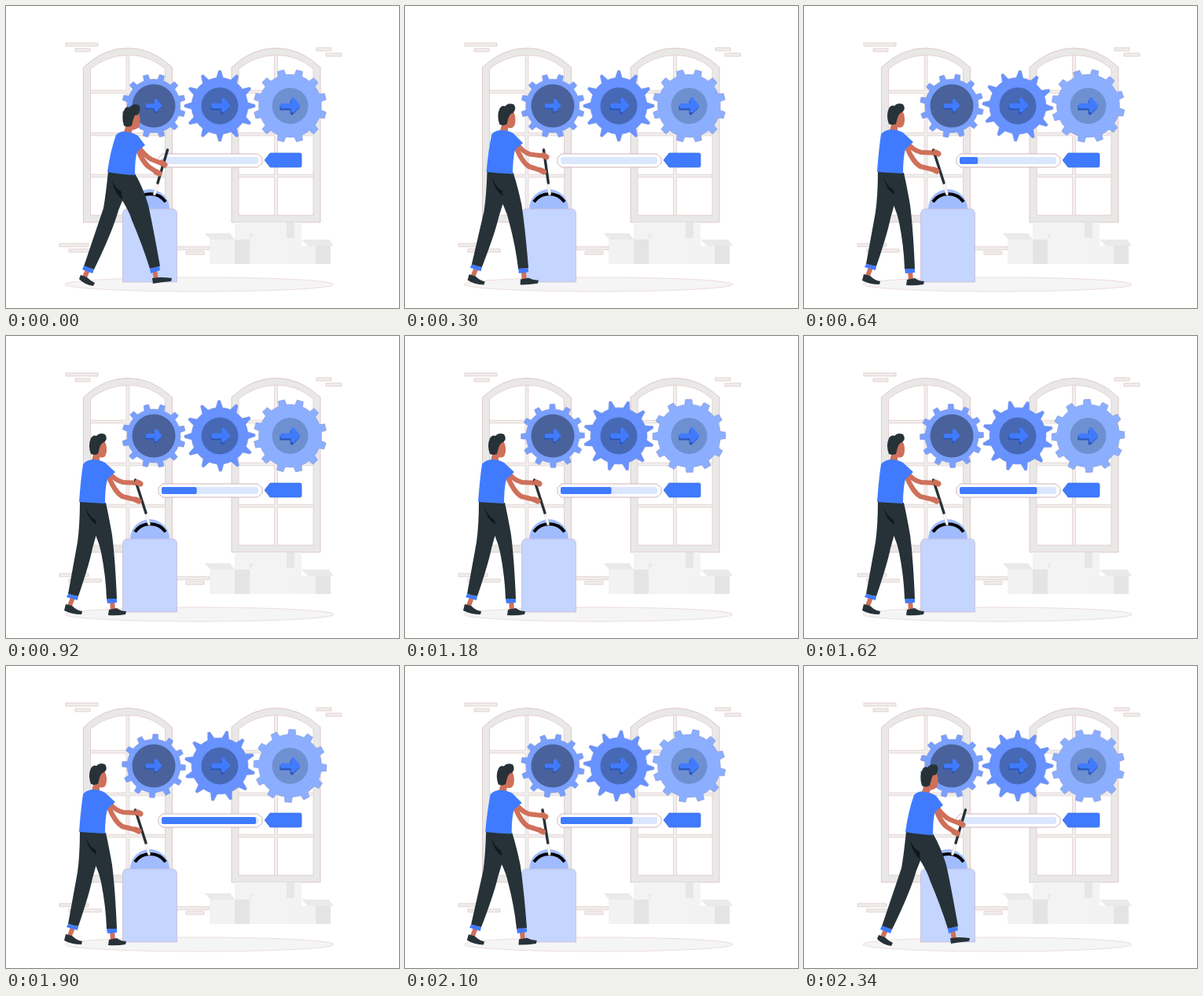
Write an HTML page that moves like this. It is 500 px wide and 384 px high and loops after 2500 ms.

```html
<!DOCTYPE html>
<html lang="en">
<head>
<meta charset="utf-8">
<title>Lever and gears</title>
<style>
  html, body { margin: 0; width: 100%; height: 100%; overflow: hidden; background: #fff; }
  svg { display: block; width: 100vw; height: 100vh; }
</style>
</head>
<body>
<svg viewBox="0 0 500 384">
  <defs>
    <g id="window">
      <path d="M98.5 275V78Q124 53.500 155 53.500T211.500 78V275Z" fill="#e9e8e8" stroke="#dabfba" stroke-width=".8"/>
      <path d="M107.500 266V80Q128 63 155 62.500T202.500 80V266Z" fill="#fff" stroke="#dec8c4" stroke-width=".8"/>
      <path d="M155 63V266M108 109H202M108 163H202M108 216H202" stroke="#e2cdc9" stroke-width="4.600"/>
      <path d="M155 63V266M108 109H202M108 163H202M108 216H202" stroke="#f0efef" stroke-width="3"/>
    </g>
    <g id="arrow">
      <path d="M-11-1H1V-6L4-8L12 2L3 11L1 9V5H-11Z" fill="#2a56b8"/>
      <path d="M-9-3H2V-9L5-10L13 0L5 8L2 7V3H-9Q-12 0-9-3Z" fill="#407bff"/>
    </g>
  </defs>

  <ellipse cx="246" cy="354" rx="171" ry="9" fill="#f5f5f5" stroke="#e6d0cc" stroke-width=".7"/>
  <path d="M76 47h41v4h-41zM88 54h19v4h-19zM395 53h19v4h-19zM407 60h20v4h-20zM68 302h37v4h-37zM80 309h41v4h-41zM205 306h54v4h-54zM229 312h23v4h-23z"
        fill="#f0eeee" stroke="#dcc2bd" stroke-width=".7"/>
  <use href="#window"/>
  <use href="#window" x="188.5"/>

  <path d="M291 275H376V328H291Z" fill="#f3f3f3"/>
  <path d="M357 275H367V295H357Z" fill="#e6e6e6"/>
  <path d="M259 297H310V328H259ZM362 305H413V328H362Z" fill="#f2f2f2"/>
  <path d="M291 297H310V328H291ZM394 305H413V328H394Z" fill="#e4e4e4"/>
  <path d="M253 289H285L291 297H260ZM310 297L315 290L310 289ZM376 297H411L417 305H384Z" fill="#ebe9e9"/>

  <g id="gears"></g>

  <path d="M199 188H320L326 193V200L320 205H199L194 200V193Z" fill="#fff" stroke="#cdb4bd"/>
  <rect x="198" y="192" width="123" height="9" rx="3" fill="#dbe6ff"/>
  <rect id="fill" x="198" y="192" height="9" rx="2" fill="#407bff"/>
  <path d="M329 196L336 187H374Q376 187 376 189V203Q376 205 374 205H336Z" fill="#407bff" stroke="#3568d8" stroke-width=".7"/>

  <path d="M158 258A25 25 0 0 1 208 258Z" fill="#a0bcff"/>
  <path d="M148.500 351V264Q149 258 154 258H212Q217 258 217.500 264V351Z" fill="#c4d5ff" stroke="#c9b5cf" stroke-width=".7"/>
  <path d="M164 249A24 24 0 0 1 203 249" fill="none" stroke="#000" stroke-width="4"/>
  <g id="man"></g>
</svg>

<script>
const LOOP = 2500;
const SKIN = '#cf705a', DARK = '#263238', BLUE = '#407bff';
const el = id => document.getElementById(id);
const add = (parent, tag, attrs) => {
  const node = document.createElementNS('http://www.w3.org/2000/svg', tag);
  for (const key in attrs) node.setAttribute(key, attrs[key]);
  return parent.appendChild(node);
};
const phase = (t, from, to) => Math.min(1, Math.max(0, (t - from) / (to - from)));
const ease = p => (1 - Math.cos(Math.PI * p)) / 2;

const TEETH = 12;

// Teeth are trapezoids; base and tip are half-widths as fractions of the pitch.
function gearPath(root, outer, base, tip) {
  const points = [];
  for (let i = 0; i < TEETH; i++)
    for (const [r, k] of [[root, -base], [outer, -tip], [outer, tip], [root, base]]) {
      const a = (i + k) * 2 * Math.PI / TEETH;
      points.push((r * Math.cos(a)).toFixed(2) + ' ' + (r * Math.sin(a)).toFixed(2));
    }
  // Rounded root between the teeth.
  return points.map((p, i) => (i ? (i % 4 ? 'L' : `A${root} ${root} 0 0 1 `) : 'M') + p).join('') + 'Z';
}

const gears = [
  { x: 188, root: 34, outer: 40.5, base: .22, tip: .15, hub: 27.5, fill: '#799fff', disc: '#4a629b', start: .5, dir: -1, size: .9, shift: -1 },
  { x: 272, root: 36, outer: 45, base: .23, tip: .06, hub: 23.5, fill: '#6792ff', disc: '#4769b5', start: 0, dir: 1, size: 1.05, shift: 0 },
  { x: 361.5, root: 40, outer: 46.5, base: .24, tip: .17, hub: 23, fill: '#8caeff', disc: '#6f90d0', start: .5, dir: -1, size: 1.1, shift: -1 }
];
for (const g of gears) {
  const group = add(el('gears'), 'g', { transform: `translate(${g.x} 127)` });
  g.wheel = add(group, 'path', {
    d: gearPath(g.root, g.outer, g.base, g.tip),
    fill: g.fill, stroke: '#7f8fd0', 'stroke-width': .5, 'stroke-linejoin': 'round'
  });
  add(group, 'circle', { r: g.hub, fill: g.disc });
  add(group, 'use', { href: '#arrow', transform: `translate(${g.shift} 0) scale(${g.size})` });
}

// Each part: pushed pose, pulled pose, fill, stroke, stroke width.
const parts = [
  // ankles and shoes
  ['M105 333L100 345', 'M86 330L81 343', 'none', SKIN, 6],
  ['M189 335L191 348', 'M135 335L136 350', 'none', SKIN, 6],
  ['M95 342L103 345Q108 350 113 352L111 356Q99 354 93 347Z', 'M76 341L84 343Q90 349 97 350L96 354Q83 354 74 349Z', DARK],
  ['M186 346L196 345Q203 345 211 346L210 350Q198 351 187 353Z', 'M131 348L141 346Q146 350 153 350L152 354Q141 356 130 355Z', DARK],
  // legs and cuffs
  ['M130 210Q127 240 124 257L99 331L112 335Q135 288 143 260L153 235L150 212Z',
   'M94 210Q94 240 91 262L79 328L92 331Q106 290 110 270L117 245L114 212Z', DARK],
  ['M135 212L138 232Q156 258 160 272Q174 305 183 334L196 331Q187 280 181 253Q174 230 164 213Z',
   'M100 212L103 232Q117 255 121 275Q127 305 128 334L141 334Q139 285 135 253Q131 230 127 212Z', DARK],
  ['M135 222Q140 233 147 236L148 246Q138 238 135 222Z', 'M101 218Q107 231 114 234L115 240Q105 234 101 218Z', '#10181c'],
  ['M99 330L112 335L110 340L97 335Z', 'M79 328L92 331L91 336L77 332Z', BLUE],
  ['M183 334L195 331L196 336L184 340Z', 'M128 334L141 334L141 339L129 340Z', BLUE],
  // far arm
  ['M168 178Q177 191 185 195L200 201', 'M133 176Q140 184 149 186L170 187', 'none', SKIN, 6],
  // head
  ['M156 142L168 135Q172 143 170 152Q167 158 161 157L159 163Q153 165 150 160Z',
   'M113 143L125 133Q130 142 127 151Q125 156 119 154L119 159Q113 163 109 158Z', SKIN],
  ['M150 152Q146 139 151 131Q153 127 157 129Q162 123 169 126Q173 132 167 139Q164 137 162 144L160 152Q154 155 150 152Z',
   'M108 150Q104 139 108 130Q111 125 115 127Q119 122 126 125Q130 131 125 135Q121 136 119 142L117 150Q112 152 108 150Z', DARK],
  // lever
  ['M189 239L193 226', 'M182 239L178 226', 'none', '#e3cfd0', 3.6],
  ['M189 239L193 226', 'M182 239L178 226', 'none', '#fff', 2.4],
  ['M193 225L205.5 183', 'M178 225L164.5 183', 'none', DARK, 3.4],
  // near arm, shirt, hands
  ['M168 183Q174 198 181 204L193 212', 'M131 180Q139 199 148 204L168 209', 'none', SKIN, 6.3],
  ['M140 164Q146 158 153 160Q162 161 168 165L177 177L167 185Q164 193 164 215Q145 214 129 211Q133 183 140 164Z',
   'M98 163Q102 158 110 157Q119 157 126 161L139 173L129 182Q126 193 126 213Q108 212 93 211Q95 183 98 163Z', BLUE],
  ['M198 199L202 202', 'M167 186L171 188', 'none', SKIN, 7],
  ['M191 211L195 213', 'M165 208L169 210', 'none', SKIN, 7]
];
const numbers = path => path.match(/[\d.]+/g).map(Number);
const man = parts.map(([a, b, fill, stroke = 'none', width = 0]) => ({
  shape: a, from: numbers(a), to: numbers(b),
  node: add(el('man'), 'path', { fill, stroke, 'stroke-width': width, 'stroke-linecap': 'round', 'stroke-linejoin': 'round' })
}));

function pose(p) {
  for (const { shape, from, to, node } of man) {
    let i = 0;
    node.setAttribute('d', shape.replace(/[\d.]+/g, () => {
      const v = from[i] + (to[i] - from[i]) * p;
      i++;
      return v.toFixed(2);
    }));
  }
}

function draw(now) {
  const t = now % LOOP;
  const back = ease(phase(t, 2000, 2300));
  pose(ease(phase(t, 180, 370)) - back);
  el('fill').setAttribute('width', 123 * phase(t, 340, 1940) * (1 - back));

  // The wheels start with the bar and advance by whole teeth, so the loop closes.
  const turn = 27 * phase(t, 340, 2310);
  for (const g of gears)
    g.wheel.setAttribute('transform', `rotate(${(g.start + g.dir * turn) * 360 / TEETH})`);
}

const begin = performance.now();
function tick() {
  draw(performance.now() - begin);
  requestAnimationFrame(tick);
}
tick();
</script>
</body>
</html>
```
